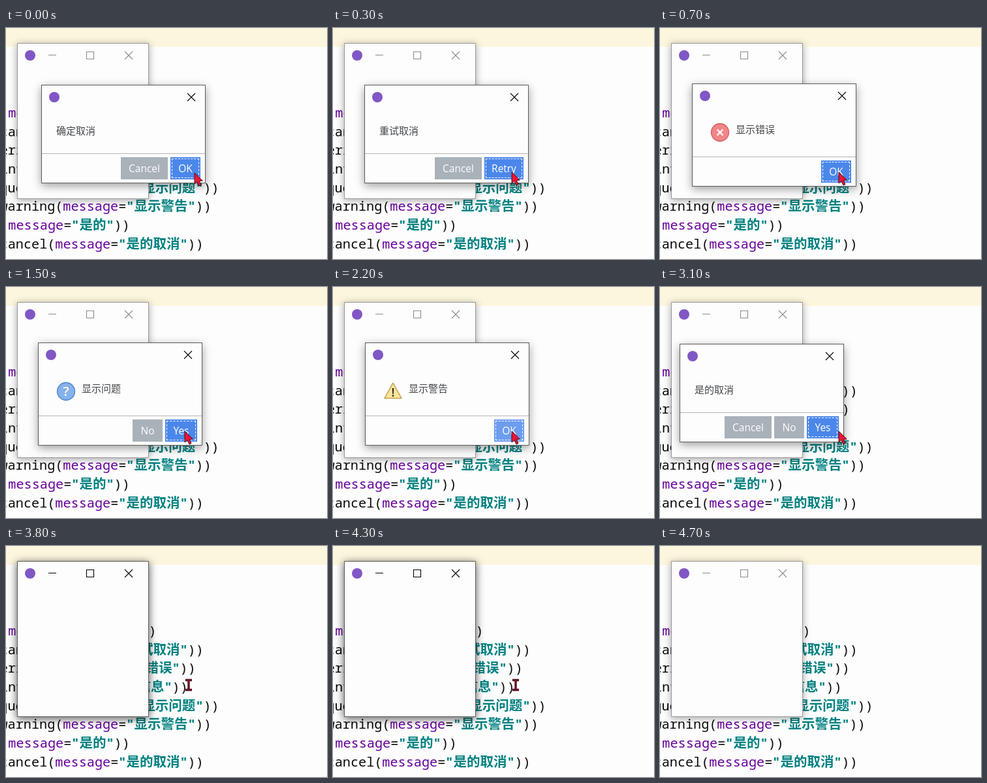
An HTML page for the animation above (4800 ms loop, 492 by 354 pixels).

```html
<!DOCTYPE html>
<html lang="zh">
<head>
<meta charset="utf-8">
<title>Message boxes</title>
<style>
html, body { margin: 0; width: 100%; height: 100%; overflow: hidden; }
#stage { position: absolute; inset: 0; overflow: hidden; background: #fdfdfd; }
#stage * { box-sizing: border-box; }
#stage div, #stage svg { position: absolute; }
#stage svg { left: 0; top: 0; overflow: visible; }
.band { left: 0; top: 0; width: 100%; height: 29px; background: #fdf6de; }
.code { font: 20.2px "Noto Sans Mono", "DejaVu Sans Mono", monospace; white-space: pre; fill: #080808; }
.code .key { fill: #660099; }
.code .str { fill: #008080; font-weight: 700; }
.code .han { font: 700 20.5px "Noto Sans CJK SC", "Noto Sans CJK", sans-serif; }
.window { background: #fdfdfd; border: 1px solid #999; }
.main { left: 17px; top: 23px; width: 202px; height: 239px; box-shadow: 0 2px 11px rgba(0,0,0,.36); color: #8c8c8c; }
.main.active { border-color: #5c5c5c; box-shadow: 0 3px 13px rgba(0,0,0,.38); color: #000; }
.dialog { width: 252px; border-color: #5c5c5c; box-shadow: 0 4px 13px rgba(0,0,0,.38); color: #000;
  background: linear-gradient(#fdfdfd, #fdfdfd) 0 0 / 100% 37px no-repeat; }
.line { fill: none; stroke: currentColor; stroke-width: 1.1; }
.body { left: -1px; top: -1px; width: 252px; height: calc(100% + 2px);
  background: linear-gradient(#fdfdfd, #fdfdfd) 1px 38px / 250px calc(100% - 39px) no-repeat; }
.rule { left: 1px; width: 250px; height: 1px; background: #b5b5b5; }
.text { top: 59px; font: 15px/22px "Noto Sans CJK SC", "Noto Sans CJK", sans-serif; color: #43464a; white-space: nowrap; }
.button { height: 34px; background: #a9b1b9; color: #fff; text-align: center; font: 15.5px/34px "Open Sans", "Noto Sans", sans-serif; }
.button.primary { background: #4b87ea; }
.button.lit { background: #6d9dee; }
.button.primary::after { content: ""; position: absolute; inset: 2px; border: 1px dashed #fff; }
</style>
</head>
<body>
<div id="stage"></div>
<script>
const LOOP = 4800;
const stage = document.getElementById('stage');

function add(parent, className, html = '', style = {}) {
  const el = document.createElement('div');
  el.className = className;
  el.innerHTML = html;
  for (const [name, value] of Object.entries(style)) {
    el.style[name] = typeof value === 'number' ? value + 'px' : value;
  }
  parent.append(el);
  return el;
}

// Holds each value of a property until the next listed time.
function hold(el, property, steps) {
  const all = [...steps, [LOOP, steps[steps.length - 1][1]]];
  const frames = all.map(([time, value]) =>
    ({ offset: time / LOOP, [property]: value, easing: 'steps(1, end)' }));
  el.animate(frames, { duration: LOOP, iterations: Infinity });
}

const show = (el, steps) => hold(el, 'opacity', steps[0][0] ? [[0, 0], ...steps] : steps);
const svg = content => `<svg width="1" height="1">${content}</svg>`;
const badge = (x, y) => `<circle cx="${x}" cy="${y}" r="8" fill="#8057c4"/>`;
const cross = (x, y) => `<path class="line" d="M${x - 6} ${y - 6}l12 12m0-12l-12 12"/>`;

// Editor
add(stage, 'band');
const ADVANCE = 12.12;
const calls = [
  ['okcancel', '确定取消', 3], ['cancel', '重试取消', 75], ['error', '显示错误', 63],
  ['info', '显示信息', 51], ['question', '显示问题', 99], ['warning', '显示警告', 87],
  ['yesno', '是的', 3], ['cancel', '是的取消', 75]
];
stage.insertAdjacentHTML('beforeend', svg(calls.map(([name, message, x], i) =>
  `<text class="code" x="${x + 0.4 - ADVANCE * (name.length + 1)}" y="${137 + 28.65 * i}">${name}(` +
  `<tspan class="key">message</tspan>=<tspan class="str">"<tspan class="han">${message}</tspan>"</tspan>))</text>`
).join('')));

// Main window, with and without focus
const mainArt = svg(badge(19, 18) + cross(170, 18) +
  '<path class="line" d="M47 17.5h12M105.5 12.5h11v11h-11z"/>');
add(stage, 'window main', mainArt);
const active = add(stage, 'window main active', mainArt);
show(active, [[0, 0], [400, 1], [500, 0], [1400, 1], [1500, 0], [3500, 1], [4600, 0]]);

// Dialogs
const disc = (fill, edge, mark) =>
  `<circle cx="43" cy="75" r="13.5" fill="${fill}" stroke="${edge}" stroke-width="1.3"/>${mark}`;
const glyph = (char, fill, size, y) =>
  `<text x="43" y="${y}" text-anchor="middle" fill="${fill}" font-family="Open Sans, sans-serif" font-weight="600" font-size="${size}">${char}</text>`;
const icons = {
  error: disc('#f08686', '#d85a5a',
    '<path d="M38.5 70.5l9 9m0-9l-9 9" stroke="#fff" stroke-width="2.2"/>'),
  info: disc('#86b1ea', '#4f83cf', glyph('i', '#fff', 20, 82)),
  question: disc('#86b1ea', '#4f83cf', glyph('?', '#fff', 20, 82)),
  warning: '<path d="M43 62L56 85.5H30Z" fill="#fbe49b" stroke="#c0a04c" stroke-width="1.5" stroke-linejoin="round"/>' +
    glyph('!', '#222', 18, 82.5)
};
const buttonWidth = { OK: 46, Cancel: 72, No: 46, Yes: 49, Retry: 60 };

// The frame and title bar appear first; the body is see-through until its content is painted.
function dialog({ x, icon, message, buttons, frame, content, lit }) {
  const tall = icon ? 7 : 0;
  const box = add(stage, 'window dialog', svg(badge(19, 18) + cross(229, 18)),
    { left: x, top: icon ? 85 : 87, height: 151 + tall });
  const body = add(box, 'body', icon ? svg(icons[icon]) : '');
  add(body, 'text', message, { left: icon ? 67 : 23 });
  add(body, 'rule', '', { top: 105 + tall });
  let right = 244;
  buttons.forEach((label, i) => {
    const width = buttonWidth[label];
    const place = { left: right - width, top: 111 + tall, width };
    add(body, i ? 'button' : 'button primary', label, place);
    if (!i && lit) show(add(body, 'button primary lit', label, place), [[lit, 1]]);
    right -= width + 4;
  });
  show(box, frame);
  if (content) show(body, content);
}

[
  { x: 54, message: '确定取消', buttons: ['OK', 'Cancel'], frame: [[0, 1], [100, .5], [200, 0]] },
  { x: 48, message: '重试取消', buttons: ['Retry', 'Cancel'], frame: [[200, 1], [400, 0]], content: [[300, 1]] },
  { x: 49, icon: 'error', message: '显示错误', buttons: ['OK'], frame: [[500, 1], [800, 0]] },
  { x: 49, icon: 'info', message: '显示信息', buttons: ['OK'], frame: [[800, 1], [1400, 0]], content: [[900, 1]] },
  { x: 49, icon: 'question', message: '显示问题', buttons: ['Yes', 'No'], frame: [[1500, 1], [1800, 0]] },
  { x: 49, icon: 'warning', message: '显示警告', buttons: ['OK'], frame: [[1800, 1], [2300, 0]], lit: 2200 },
  { x: 66, message: '是的', buttons: ['Yes', 'No'], frame: [[2300, 1], [2800, 0]], content: [[2400, 1]] },
  { x: 30, message: '是的取消', buttons: ['Yes', 'No', 'Cancel'], frame: [[2800, 1], [3400, .5], [3500, 0]], content: [[2900, 1]] }
].forEach(dialog);

// Pointer
const move = (x, y) => `translate(${x}px, ${y}px)`;
const arrow = add(stage, 'pointer', svg(
  '<path d="M0 0V17L4 13.5L7 20L10 18.6L7.3 12.6L12.3 12Z" fill="#ee1438" stroke="#4a0a16" stroke-width="1"/>'));
hold(arrow, 'transform', [[0, move(289, 222)], [300, move(274, 221)]]);
show(arrow, [[0, 1], [3500, 0]]);

const beam = add(stage, 'pointer', svg(
  '<path d="M-5 -7.5H5M-5 7.5H5M0 -7.5V7.5" fill="none" stroke="#4a0d18" stroke-width="3.4"/>' +
  '<path d="M-4 -7.5H4M-4 7.5H4M0 -7.5V7.5" fill="none" stroke="#8c1c30" stroke-width="1"/>'));
hold(beam, 'transform', [[0, move(280, 213)], [4400, move(330, 258)], [4500, move(395, 305)], [4600, move(450, 343)]]);
show(beam, [[3500, 1], [4700, 0]]);
</script>
</body>
</html>
```
